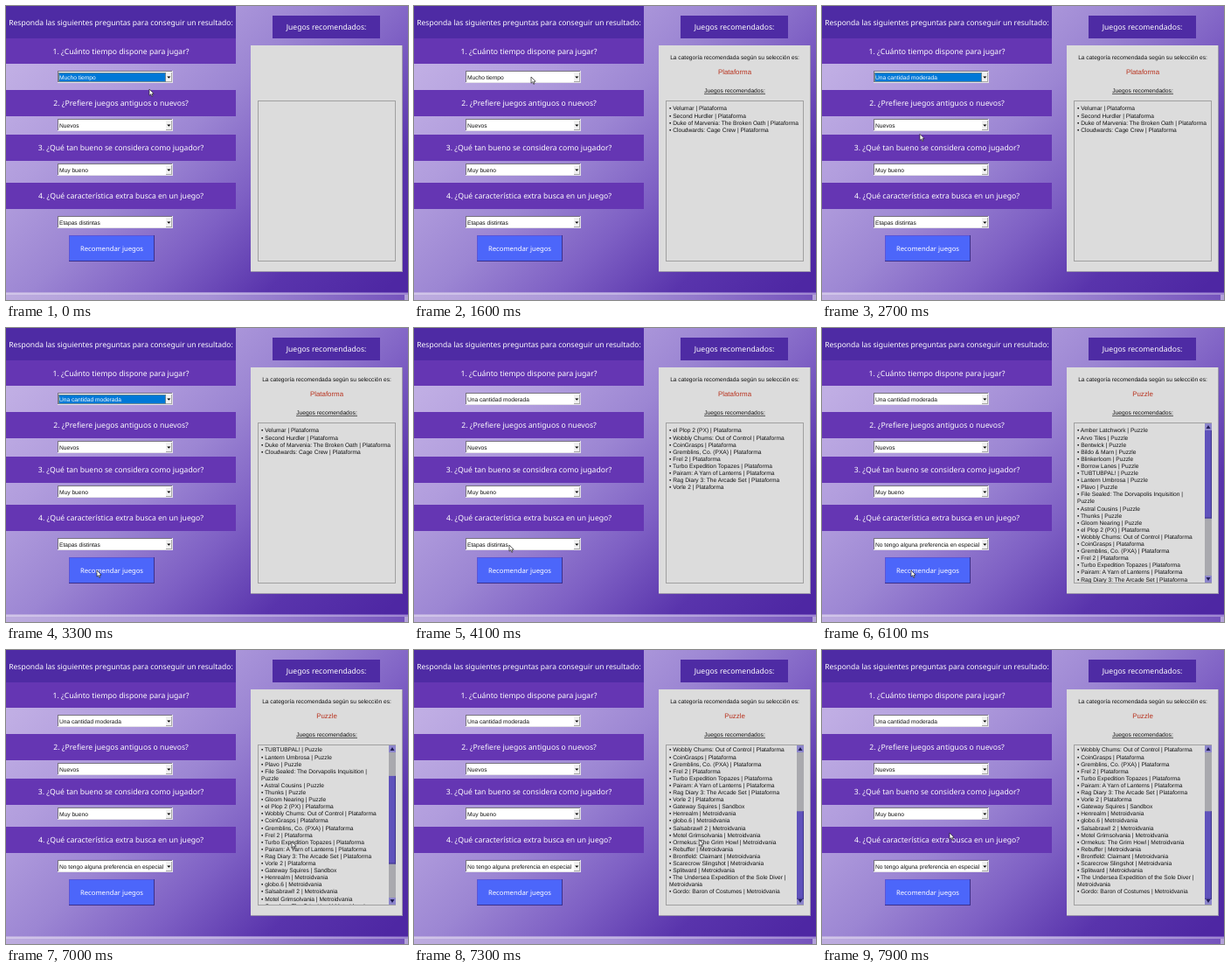
Write an HTML page with a canvas that moves like this. It is 460 px wide and 336 px high and loops after 8000 ms.

```html
<!DOCTYPE html>
<html lang="es">
<head>
<meta charset="utf-8">
<title>Juegos recomendados</title>
<style>
html, body { margin: 0; width: 100%; height: 100%; overflow: hidden; }
canvas { display: block; }
</style>
</head>
<body>
<canvas id="stage" width="460" height="336"></canvas>
<script>
const ctx = document.getElementById('stage').getContext('2d');
const LOOP = 8000;
const SANS = '"Liberation Sans", Arial, sans-serif';
const UI = '"Noto Sans", "Open Sans", sans-serif';
const HEADER = '#4e2ba4', BAND = '#6536b3';

const tag = (names, genre) => names.map(name => `• ${name} | ${genre}`);

const modernPlatform = tag(['Velumar', 'Second Hurdler',
  'Duke of Marvenia: The Broken Oath', 'Cloudwards: Cage Crew'], 'Plataforma');

const moderatePlatform = tag(['el Plop 2 (PX)', 'Wobbly Chums: Out of Control', 'CoinGrasps',
  'Gremblins, Co. (PXA)', 'Frel 2', 'Turbo Expedition Topazes', 'Pairam: A Yarn of Lanterns',
  'Rag Diary 3: The Arcade Set', 'Vorle 2'], 'Plataforma');

const mixed = [
  ...tag(['Amber Latchwork', 'Arvo Tiles', 'Bentwick', 'Bildo & Marn', 'Blinkerloom', 'Borrow Lanes',
    'TUBTUBPAL!', 'Lantern Umbrosa', 'Plavo'], 'Puzzle'),
  '• File Sealed: The Dorvapolis Inquisition |', 'Puzzle',
  ...tag(['Astral Cousins', 'Thunks', 'Gloom Nearing'], 'Puzzle'),
  ...moderatePlatform,
  ...tag(['Gateway Squires'], 'Sandbox'),
  ...tag(['Henrealm', 'globo.6', 'Salsabrawl! 2', 'Motel Grimsolvania', 'Ormekus: The Grim Howl',
    'Rebuffer', 'Brontfeld: Claimant', 'Scarecrow Slingshot', 'Splitward'], 'Metroidvania'),
  '• The Undersea Expedition of the Sole Diver |', 'Metroidvania',
  ...tag(['Gordo: Baron of Costumes'], 'Metroidvania')
];

const results = [
  { at: 1000, category: 'Plataforma', lines: modernPlatform },
  { at: 3400, category: 'Plataforma', lines: moderatePlatform },
  { at: 5900, category: 'Puzzle', lines: mixed }
];

// time, x, y of the pointer tip
const pointerPath = [
  [0, 164, 95], [100, 162, 100], [700, 108, 277], [1000, 108, 277], [1500, 134, 79],
  [1600, 134, 81], [1900, 134, 82], [2300, 128, 104], [2500, 128, 104], [2700, 112, 146],
  [3100, 104, 277], [3500, 104, 277], [4000, 109, 246], [4100, 109, 248], [4400, 109, 248],
  [4900, 106, 286], [5200, 106, 286], [5400, 102, 277], [6500, 102, 277], [6900, 327, 220],
  [7000, 327, 219], [7400, 326, 216], [7500, 325, 212], [7600, 325, 212], [7900, 146, 209]
];

function rect(x, y, w, h, color) {
  ctx.fillStyle = color;
  ctx.fillRect(x, y, w, h);
}

function frame(x, y, w, h, color) {
  ctx.strokeStyle = color;
  ctx.lineWidth = 1;
  ctx.strokeRect(x + .5, y + .5, w - 1, h - 1);
}

// Right and bottom edge of a raised box
function shade(x, y, w, h, color) {
  rect(x + w - 1, y, 1, h, color);
  rect(x, y + h - 1, w, 1, color);
}

function text(str, x, y, size, color, align = 'left', family = SANS) {
  ctx.font = `${size}px ${family}`;
  ctx.textAlign = align;
  ctx.fillStyle = color;
  ctx.fillText(str, x, y);
}

function polygon(points, fill, stroke) {
  ctx.beginPath();
  points.forEach(([x, y]) => ctx.lineTo(x, y));
  ctx.closePath();
  ctx.fillStyle = fill;
  ctx.fill();
  if (stroke) {
    ctx.strokeStyle = stroke;
    ctx.lineWidth = .7;
    ctx.stroke();
  }
}

function gradient(x0, y0, x1, y1, colors) {
  const g = ctx.createLinearGradient(x0, y0, x1, y1);
  colors.forEach((c, i) => g.addColorStop(i / (colors.length - 1), c));
  return g;
}

function label(str, x, y, w, h, color, size) {
  rect(x, y, w, h, color);
  text(str, x + w / 2, y + h / 2 + 3, size, '#fff', 'center', UI);
}

function combo(y, value, selected) {
  rect(59, y, 132, 14, '#fff');
  frame(59, y, 132, 14, '#77727f');
  shade(59, y, 132, 14, '#e4e2e8');
  if (selected) {
    rect(60, y + 2, 123, 11, '#0078d7');
    ctx.setLineDash([1, 1]);
    frame(60, y + 2, 123, 11, '#d79a50');
    ctx.setLineDash([]);
  }
  text(value, 61, y + 10, 6.65, selected ? '#fff' : '#111');
  rect(183, y + 2, 7, 11, '#f0f0f0');
  shade(183, y + 2, 7, 11, '#a8a8a8');
  polygon([[184.3, y + 6.5], [188.3, y + 6.5], [186.3, y + 8.7]], '#000');
}

function scrollbar(first, total) {
  const trackTop = 117, trackHeight = 166;
  const top = trackTop + first / total * trackHeight;
  const height = 22.4 / total * trackHeight;
  rect(438, 109, 8, 182, '#a9a9ae');
  rect(438, 109, 8, 8, '#8d86cc');
  rect(438, 283, 8, 8, '#8d86cc');
  polygon([[439.5, 115], [444.5, 115], [442, 111]], '#1f1b55');
  polygon([[439.5, 285], [444.5, 285], [442, 289]], '#1f1b55');
  rect(438, top, 8, height, '#5f52bb');
  shade(438, top, 8, height, '#40368c');
}

function resultPanel(t) {
  rect(280, 45, 174, 259, '#dcdcdc');
  shade(280, 45, 174, 259, '#9c97ac');
  frame(288, 108, 158, 184, '#a0a0a0');
  const result = results.filter(r => t >= r.at).pop();
  if (!result) return;

  text('La categoría recomendada según su selección es:', 367, 60.6, 6.62, '#111', 'center');
  text(result.category, 367, 78, 7.9, '#b8321e', 'center');
  text('Juegos recomendados:', 367, 99, 6.7, '#111', 'center');
  rect(332, 100, 70, .7, '#222');

  const scrollable = result.lines === mixed;
  const first = scrollable ? 3 * Math.max(0, Math.min(5, Math.floor((t - 6800) / 100))) : 0;
  ctx.save();
  ctx.beginPath();
  ctx.rect(289, 109, 156, 182);
  ctx.clip();
  result.lines.slice(first, first + 24).forEach((line, i) =>
    text(line, 292, (first ? 116.4 : 119.4) + i * 8.1, 6.65, '#111'));
  ctx.restore();
  if (scrollable) scrollbar(first, mixed.length + 1);
}

function pointer(t) {
  let i = pointerPath.findIndex(p => p[0] > t);
  if (i < 0) i = pointerPath.length;
  const [t0, x0, y0] = pointerPath[i - 1];
  const [t1, x1, y1] = pointerPath[i] || [LOOP, x0, y0];
  const k = (t - t0) / (t1 - t0);
  ctx.save();
  ctx.translate(x0 + (x1 - x0) * k, y0 + (y1 - y0) * k);
  polygon([[0, 0], [0, 7.2], [1.7, 5.7], [2.8, 8.3], [4, 7.8], [2.9, 5.3], [5.1, 5.2]], '#fff', '#222');
  ctx.restore();
}

function background() {
  rect(0, 0, 460, 336, gradient(40, 40, 380, 380,
    ['#c0aee4', '#b19ddd', '#9c86d3', '#7e60c4', '#5934ac', '#4e27a3']));
  rect(0, 327, 460, 9, gradient(0, 0, 460, 0, ['#bdacdf', '#a793d6', '#7452bc']));
  rect(0, 328, 460, 2, 'rgba(255,255,255,.3)');
  rect(456, 330, 4, 6, '#b3a2d8');
}

function draw(t) {
  background();
  label('Responda las siguientes preguntas para conseguir un resultado:', 0, 0, 263, 37, HEADER, 8.5);
  label('1. ¿Cuánto tiempo dispone para jugar?', 0, 37, 263, 29, BAND, 8.65);
  label('2. ¿Prefiere juegos antiguos o nuevos?', 0, 96, 263, 30, BAND, 8.65);
  label('3. ¿Qué tan bueno se considera como jugador?', 0, 147, 263, 30, BAND, 8.65);
  label('4. ¿Qué característica extra busca en un juego?', 0, 202, 263, 30, BAND, 8.65);

  const moderate = t >= 2400, noPreference = t >= 5100;
  combo(74, moderate ? 'Una cantidad moderada' : 'Mucho tiempo', t < 1000 || moderate && t < 3400);
  combo(129, 'Nuevos', false);
  combo(180, 'Muy bueno', false);
  combo(240, noPreference ? 'No tengo alguna preferencia en especial' : 'Etapas distintas',
    noPreference && t < 5900);

  label('Recomendar juegos', 72, 262, 98, 30, '#4c66fa', 7.7);
  frame(72, 262, 98, 30, '#5a55d8');
  shade(72, 262, 98, 30, '#3a2f8c');

  label('Juegos recomendados:', 305, 11, 123, 26, HEADER, 8.55);
  resultPanel(t);
  pointer(t);
}

ctx.textRendering = 'geometricPrecision';
const start = performance.now();
function tick() {
  draw((performance.now() - start) % LOOP);
  requestAnimationFrame(tick);
}
tick();
</script>
</body>
</html>
```
